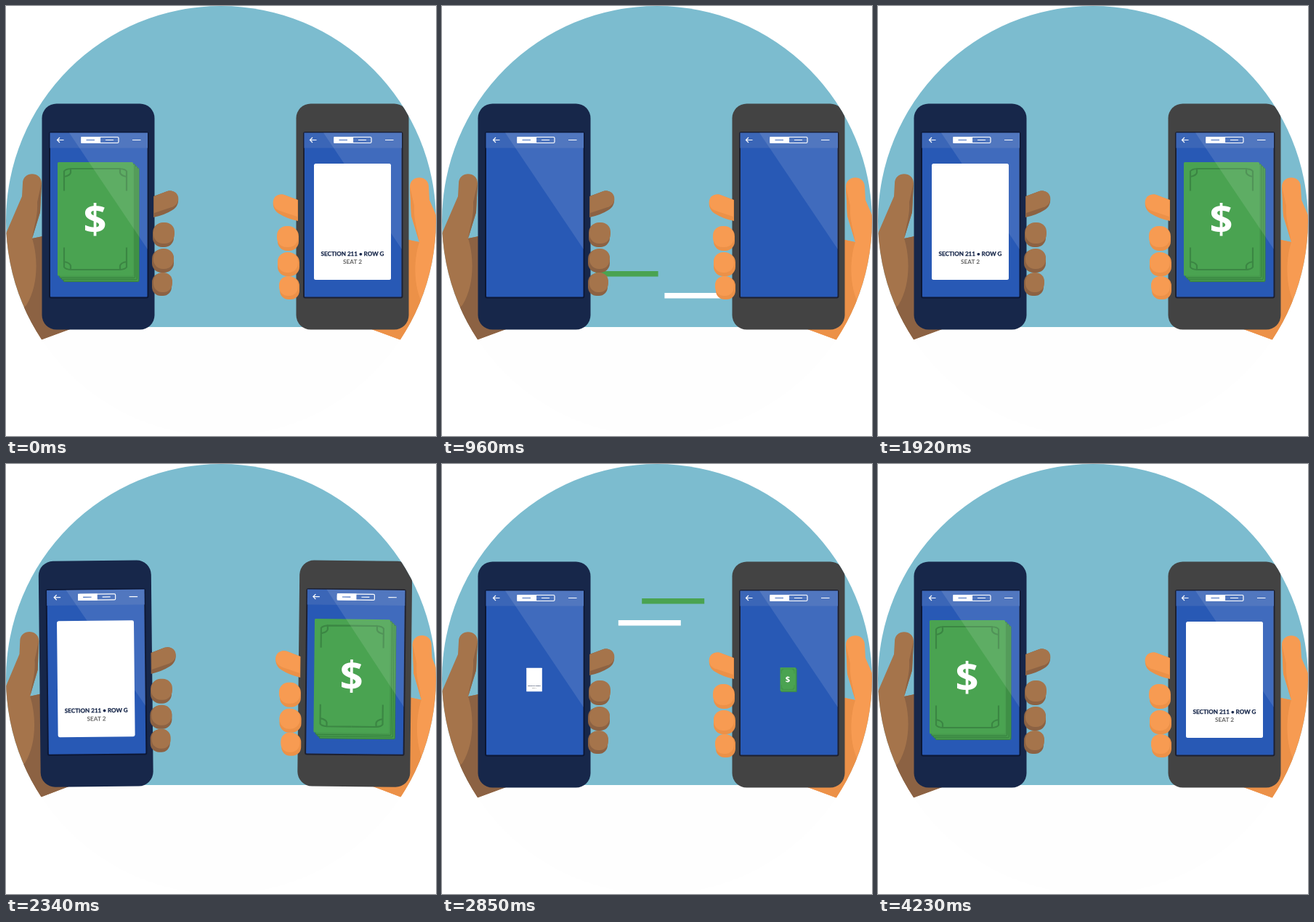
An HTML page for the animation above (4260 ms loop, 592 by 592 pixels).

```html
<!DOCTYPE html>
<html lang="en">
<head>
<meta charset="utf-8">
<title>Ticket swap</title>
<style>
  html, body { margin: 0; width: 100%; height: 100%; overflow: hidden; background: #fff; }
  svg { display: block; width: 100vw; height: 100vh; }
  text { font-family: Lato, "Open Sans", sans-serif; font-weight: 700; text-anchor: middle; }
  .sign { font-family: "Open Sans", sans-serif; }
  .skin { fill: var(--skin); }
  .shade { fill: var(--shade); }
  .left { --skin: #a5744b; --shade: #8c6243; --body: #17274a; --edge: #0c1735; }
  .right { --skin: #f79b52; --shade: #ec9148; --body: #434343; --edge: #1d2030; }
</style>
</head>
<body>
<svg viewBox="0 0 592 592">
  <defs>
    <clipPath id="disc"><circle cx="296" cy="296" r="296"/></clipPath>

    <!-- All parts are placed as on the left phone. -->
    <g id="palm">
      <path class="skin" d="M23 244C23 227 49 227 49 244L47 284L36 320L60 315V430H128L88 445L-140 529V500L-30 400L0 313L22 262Z"/>
      <path class="shade" d="M49 243L47 284L36 320C39 300 44 290 43 270Z"/>
      <path class="shade" d="M60 315L36 320C44 345 45 385 28 412L-100 514L88 445L128 430H60Z"/>
    </g>

    <g id="fingers">
      <path class="shade" d="M203 262L222 255C238 251 243 273 229 281Q218 288 203 291Z"/>
      <path class="skin" d="M204 262L222 255C239 251 243 272 228 277L204 285Z"/>
      <g class="shade">
        <rect x="202" y="299" width="29" height="33" rx="13"/>
        <rect x="201" y="335" width="30" height="32" rx="13"/>
        <rect x="201" y="368" width="27" height="31" rx="12"/>
      </g>
      <g class="skin">
        <rect x="203" y="298" width="29" height="29" rx="13"/>
        <rect x="203" y="334" width="28" height="28" rx="13"/>
        <rect x="203" y="367" width="26" height="27" rx="12"/>
      </g>
    </g>

    <g id="phone">
      <rect x="49.500" y="134.500" width="155" height="311" rx="20" fill="var(--body)"/>
      <rect x="60" y="174" width="135.500" height="227.500" rx="2" fill="#2859b5" stroke="var(--edge)" stroke-width="2"/>
      <path d="M60.500 174.500H195V195.500H60.500Z" fill="#3b66b7"/>
    </g>

    <g id="menu" fill="none" stroke="#fff" stroke-width="1.200">
      <path d="M79.500 184.500H70.500M74 181L70.500 184.500L74 188M174 184.500H185.500M137 184.500H148"/>
      <rect x="104" y="180.500" width="51" height="8" rx="1.500"/>
      <path d="M104 180.500H129.500V188.500H104Z" fill="#fff"/>
      <path d="M110.500 184.500H122" stroke="#2859b5"/>
    </g>

    <path id="glare" d="M87 174.500H195V335Z" fill="#fff" opacity=".11"/>

    <!-- Cards are centred on the origin. -->
    <g id="ticket">
      <rect x="-53" y="-80" width="106" height="160" rx="2.500" fill="#fff"/>
      <text y="46.500" font-size="8.100" fill="#17274a" stroke="#17274a" stroke-width=".25">SECTION 211 • ROW G</text>
      <text y="58" font-size="8.300" fill="#666">SEAT 2</text>
    </g>

    <path id="corner" d="M0 -69.500H-34V-64Q-35 -60 -43 -58.500V-39M-34 -69.500Q-41 -69 -43 -66V-58.500"/>
    <g id="money">
      <g fill="#46994d" stroke="#35803d">
        <rect x="-48" y="-74" width="104" height="156.500" rx="1.500"/>
        <rect x="-50.700" y="-76.700" width="104" height="156.500" rx="1.500"/>
        <rect x="-53.300" y="-79.300" width="104" height="156.500" rx="1.500"/>
      </g>
      <rect x="-56" y="-82" width="104" height="156.500" rx="1.500" fill="#4aa351"/>
      <g transform="translate(-4 -3.500)" fill="none" stroke="#3b8643" stroke-width="2.200">
        <use href="#corner"/>
        <use href="#corner" transform="scale(-1 1)"/>
        <use href="#corner" transform="scale(1 -1)"/>
        <use href="#corner" transform="scale(-1 -1)"/>
      </g>
      <text class="sign" x="-4.500" y="16" font-size="56" fill="#fff">$</text>
    </g>
  </defs>

  <g clip-path="url(#disc)">
    <path d="M0 0H592V592H0Z" fill="#fefefe"/>
    <path d="M0 0H592V442H0Z" fill="#7cbccf"/>
    <g id="scene"></g>
  </g>
</svg>
<script>
const LOOP = 4260, START = 150, HALF = 2190, STEP = 30;
const GREEN = '#4aa351', WHITE = '#fff';
const scene = document.getElementById('scene');

const clamp = x => Math.min(1, Math.max(0, x));
const lerp = (a, b, x) => a + (b - a) * x;
const smooth = x => x * x * (3 - 2 * x);
const easeIn = x => x * x;
const easeOut = x => 1 - (1 - x) ** 2;

// Keys are [time, value, easing into this key].
function at(keys, time) {
  const i = keys.findIndex(k => k[0] > time);
  if (i < 0) return keys[keys.length - 1][1];
  if (i === 0) return keys[0][1];
  const [t0, v0] = keys[i - 1], [t1, v1, ease = smooth] = keys[i];
  return lerp(v0, v1, ease((time - t0) / (t1 - t0)));
}

const SWING = [[0, -.6], [105, -12], [210, 12], [300, .5, easeOut], [420, 0]];
const RECOIL = [[180, 0], [300, 1], [480, 0]];
const SHRINK = [[210, 1], [330, 1.12], [529, 0, easeIn]];
const GROW = [[1115, 0], [1455, 1.22, easeOut], [1680, 1]];

// Inner and outer end of each ray in one quarter of the burst.
const RAYS = [[0, -87, 0, -119], [52, -71, 70, -96.5], [84, -27, 114, -36.5]];

function burst(u, start, x, color) {
  const head = clamp((u - start) / 60), tail = clamp((u - 1530) / 90);
  if (head <= 0 || tail >= 1) return '';
  let d = '';
  for (const [x0, y0, x1, y1] of RAYS)
    for (const sx of [1, -1])
      for (const sy of [1, -1]) {
        const point = k => `${sx * lerp(x0, x1, k)} ${sy * lerp(y0, y1, k)}`;
        d += `M${point(tail)}L${point(head)}`;
      }
  return `<path transform="translate(${x} 294.500)" d="${d}" stroke="${color}" stroke-width="5" stroke-linecap="round"/>`;
}

function side(u, isLeft, hasMoney) {
  const dir = isLeft ? 1 : -1;
  const recoil = at(RECOIL, u);
  const x = (isLeft ? 0 : 350) - dir * recoil * (isLeft ? 3.7 : 8);
  const flip = isLeft ? '' : 'transform="translate(255 5) scale(-1 1)"';
  const scale = u < 800 ? at(SHRINK, u) : at(GROW, u - (isLeft ? 0 : 20));
  const card = hasMoney ? 'money' : 'ticket';
  return `<g class="${isLeft ? 'left' : 'right'}"
      transform="translate(${x} ${recoil}) rotate(${dir * at(SWING, u)} ${isLeft ? 0 : 255} 600)">
    <use href="#palm" ${flip}/>
    <use href="#phone"/>
    <use href="#menu" x="${isLeft ? 0 : -2}"/>
    <use href="#fingers" ${flip}/>
    ${burst(u, isLeft ? 1190 : 1265, isLeft ? 127 : 132, hasMoney ? GREEN : WHITE)}
    ${scale > 0 ? `<use href="#${card}" transform="translate(127 297) scale(${scale})"/>` : ''}
    <use href="#glare"/>
  </g>`;
}

// Pairs of streaks cross the gap between the phones in opposite directions.
function streaks(u, moneyGoesRight) {
  let out = '';
  for (let i = 0; i < 6; i++) {
    const reach = (u - 450 - i * 105) * 2.08;
    const head = Math.min(196, reach), tail = Math.max(0, reach - 86);
    if (head <= tail) continue;
    const y = 185 + [0, 120, 60, 180, 30, 90][i];
    const bar = (right, top, color) =>
      `<rect x="${right ? 204 + tail : 400 - head}" y="${top}" width="${head - tail}" height="7.500" fill="${color}"/>`;
    out += bar(moneyGoesRight, y, GREEN) + bar(!moneyGoesRight, y + 30, WHITE);
  }
  return out;
}

function draw(now) {
  const t = Math.floor(now % LOOP / STEP) * STEP;
  const s = (t - START + LOOP) % LOOP;
  const back = s >= HALF;
  const u = back ? s - HALF : s;
  const moneyLeft = (u < 800) !== back;
  scene.innerHTML = streaks(u, !back) + side(u, true, moneyLeft) + side(u, false, !moneyLeft);
}

const begin = performance.now();
function tick() {
  draw(performance.now() - begin);
  requestAnimationFrame(tick);
}
tick();
</script>
</body>
</html>
```
